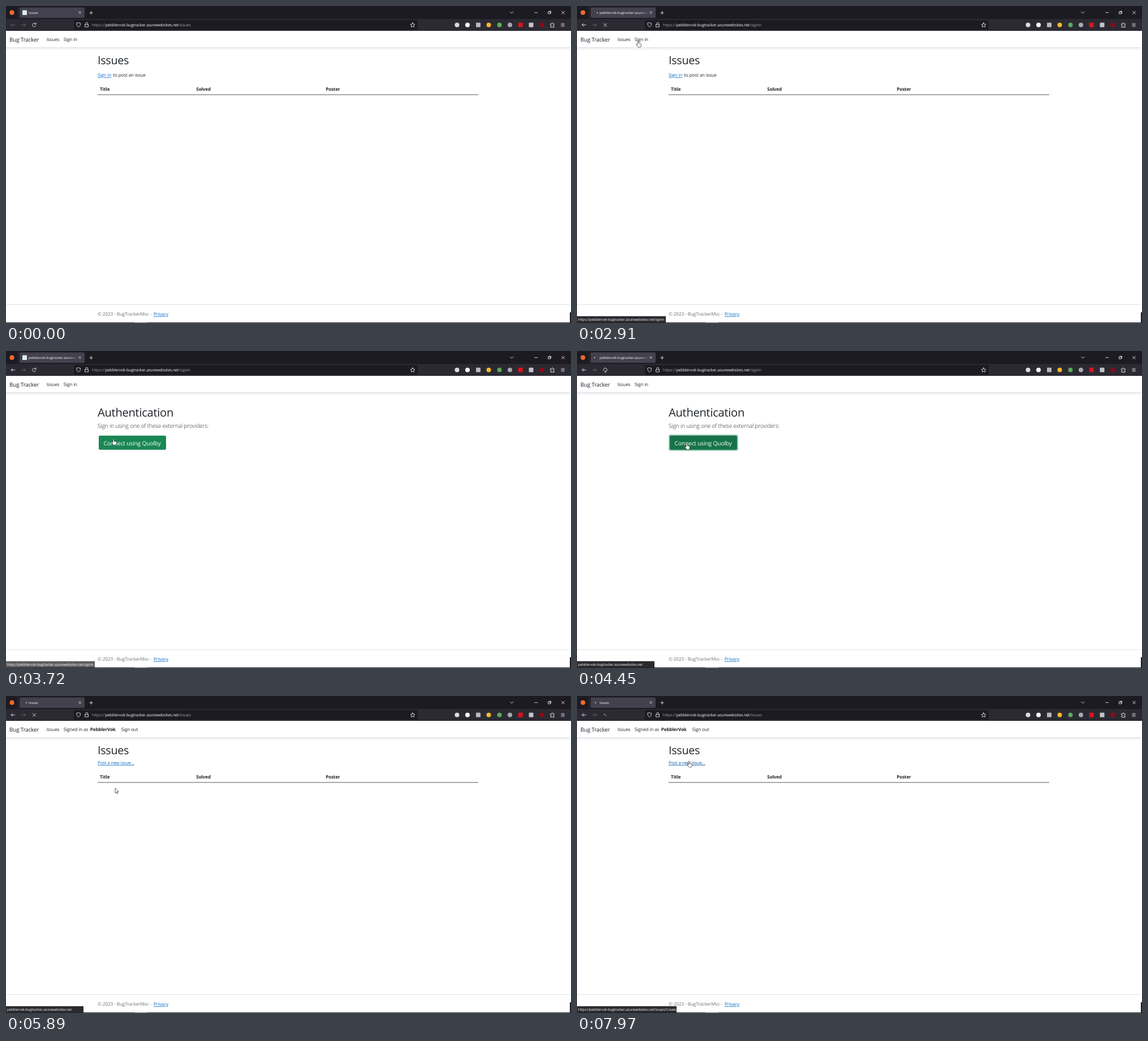
An HTML page that plays this animation: 999 by 561 pixels, repeating every 8 s.

```html
<!DOCTYPE html>
<html lang="en">
<head>
<meta charset="utf-8">
<title>Bug Tracker</title>
<style>
  html, body { margin: 0; width: 100%; height: 100%; overflow: hidden; background: #fff; }
  svg { display: block; width: 100%; height: 100%; }
  text {
    font: 8.1px "Open Sans", "Noto Sans", sans-serif;
    letter-spacing: -.015em;
    text-rendering: geometricPrecision;
    white-space: pre;
    fill: #212529;
  }
  .brand { font-size: 9.9px; }
  .h1 { font-size: 19.7px; }
  .auth { font-size: 20.2px; }
  .lead { font-size: 10.1px; font-weight: 300; }
  .btn { font-size: 10.2px; fill: #fff; }
  .b { font-weight: 700; }
  .link { fill: #0a6bc4; text-decoration: underline; }
  .foot { font-size: 8.25px; fill: #6c757d; }
  .tab { font-size: 5.9px; fill: #fbfbfe; }
  .url { font-size: 6.95px; fill: #fbfbfe; }
  .dim { fill: #a09fa6; }
  .status { font-size: 6.1px; fill: #fbfbfe; }
  .line { fill: none; stroke: #e4e4e8; stroke-width: .9; stroke-linecap: round; stroke-linejoin: round; }
  .cursor path { fill: #fff; stroke: #111; stroke-width: .65; stroke-linejoin: round; }
</style>
</head>
<body>
<svg viewBox="0 0 999 561">
  <defs>
    <linearGradient id="shade" x2="0" y2="1">
      <stop stop-color="#000" stop-opacity=".07"/>
      <stop offset="1" stop-color="#000" stop-opacity="0"/>
    </linearGradient>
    <linearGradient id="fade">
      <stop stop-color="#42414d" stop-opacity="0"/>
      <stop offset="1" stop-color="#42414d"/>
    </linearGradient>
    <clipPath id="tabClip"><path d="M39 5h87v15H39z"/></clipPath>
  </defs>

  <!-- tab strip -->
  <path d="M0 0h999v23H0z" fill="#1c1b22"/>
  <path d="M21 0h1v23h-1z" fill="#34333b"/>
  <circle cx="10.5" cy="11.7" r="4.1" fill="#f0682c"/>
  <rect x="24" y="2.5" width="115" height="18.5" rx="2" fill="#42414d"/>
  <rect id="favicon" x="29" y="7.4" width="8" height="8.6" rx=".6" fill="#dcebef"/>
  <circle id="dot" cy="11.8" r="1.15" fill="#d0d0d6"/>
  <g clip-path="url(#tabClip)"><text id="tabTitle" class="tab" x="40" y="14"></text></g>
  <path d="M111 4h15v16h-15z" fill="url(#fade)"/>
  <g class="line">
    <path d="M128.7 9.7l3.8 3.8m0-3.8l-3.8 3.8M147.8 12h5.6m-2.8-2.8v5.6"/>
    <path d="M891.5 10.2l2.7 2.7 2.7-2.7M934.8 11.6h4.8M982.6 9.3l4.8 4.8m0-4.8l-4.8 4.8"/>
    <path d="M958.8 10.4h3.5v3.5h-3.5zM960 10.2V9.2h3.5v3.6h-1"/>
  </g>

  <!-- tool bar -->
  <path d="M0 23h999v21H0z" fill="#2b2a33"/>
  <rect x="120" y="25" width="608" height="17" rx="2" fill="#1c1b22"/>
  <g class="line">
    <path id="back" d="M15.8 33.5H9m2.8-2.8L9 33.5l2.8 2.8"/>
    <path d="M27.5 33.5h6.8m-2.8-2.8l2.8 2.8-2.8 2.8" stroke="#696870"/>
    <path id="reload" d="M52.7 35a3.2 3.2 0 1 1-.3-3.4M53 29.8v2.4h-2.4"/>
    <path id="stop" d="M47.2 30.8l5.4 5.4m0-5.4l-5.4 5.4"/>
    <path id="spark" d="M47.7 31.4l3.4 3.7"/>
    <path d="M128.2 29.6l3.5 1.1q.1 4.8-3.5 6.8-3.6-2-3.5-6.8z"/>
    <path d="M140.8 32.6v-1.5a1.9 1.9 0 0 1 3.8 0v1.5M139.9 32.8h5.6v4.2h-5.6z"/>
    <path d="M719 29.6l1.2 2.5 2.8.4-2 1.9.5 2.8-2.5-1.3-2.5 1.3.5-2.8-2-1.9 2.8-.4z"/>
    <path d="M962.8 31.6h2v-.7a1.1 1.1 0 0 1 2.2 0v.7h2.2v2h-.7a1.1 1.1 0 0 0 0 2.2h.7v1.7h-6.4v-1.8h.5a1.1 1.1 0 0 0 0-2.2h-.5z"/>
    <path d="M981.8 31.1h5.4m-5.4 2.4h5.4m-5.4 2.4h5.4"/>
  </g>
  <g id="addons"></g>
  <text class="url dim" x="152" y="36.2">https://</text>
  <text class="url" x="175.4" y="36.2">pebblervok-bugtracker.azurewebsites.net<tspan id="path" class="dim"></tspan></text>

  <!-- site header and footer -->
  <path d="M0 44h999v516H0z" fill="#fff"/>
  <path d="M0 74h997v5H0z" fill="url(#shade)"/>
  <path d="M0 73h997v1H0zM0 528h997v1H0z" fill="#dee2e6"/>
  <text class="brand" x="6" y="63.4">Bug Tracker</text>
  <text x="71.7" y="62.4">Issues</text>
  <text class="foot" x="162" y="548.3">© 2023 - BugTrackerMvc -</text>
  <text class="link" x="261" y="548.3">Privacy</text>

  <g id="guest"><text x="101.8" y="62.4">Sign in</text></g>
  <g id="member">
    <text x="101.8" y="62.4">Signed in as</text>
    <text class="b" x="148.8" y="62.4">PebblerVok</text>
    <text x="203.7" y="62.4">Sign out</text>
    <text id="post" class="link" x="162" y="121.2" style="font-size:7.9px">Post a new issue...</text>
  </g>

  <g id="list">
    <text class="h1" x="162" y="103.2">Issues</text>
    <g id="invite">
      <text class="link" x="162" y="125.4">Sign in</text>
      <text x="189.2" y="125.4">to post an issue</text>
    </g>
    <g id="table">
      <text class="b" x="166" y="150.2">Title</text>
      <text class="b" x="336.3" y="150.2">Solved</text>
      <text class="b" x="565.3" y="150.2">Poster</text>
      <path d="M162 156.5h673v1H162z" fill="#53575a"/>
    </g>
  </g>

  <g id="auth">
    <text class="auth" x="162" y="115.6">Authentication</text>
    <text class="lead" x="162" y="136.2">Sign in using one of these external providers:</text>
    <rect id="ring" x="162" y="147.8" width="123" height="29" rx="3.5" fill="#9dccb6"/>
    <rect id="button" x="164" y="149.8" width="119" height="25" rx="2"/>
    <text class="btn" x="172.6" y="166.6">Connect using Quolby</text>
  </g>

  <!-- desktop edge -->
  <path d="M0 560h999v1H0zM997 542h2v19h-2z" fill="#1b1b1f"/>
  <path d="M227 560h23v1h-23z" fill="#66666c"/>

  <g id="status">
    <rect id="statusBox" y="549" height="11.3" fill="#2b2a2f"/>
    <text id="statusText" class="status" x="2" y="556.9"></text>
  </g>

  <g id="cursor" class="cursor">
    <path id="arrow" d="M0 0V8.8L2 7l1.4 3.1 1.4-.6L3.4 6.4H6.2Z"/>
    <path id="hand" d="M-1 1a1 1 0 0 1 2 0V4.2q1-.6 1.6.2 1-.5 1.5.3 1.2-.3 1.2 1V8q0 3-2.6 3H1.4Q0 11-.8 9.8L-3 7q-.6-1 .3-1.3.8-.1 1.7 1Z"/>
  </g>
</svg>
<script>
const LOOP = 8000, STEP = 90;
const HOST = 'pebblervok-bugtracker.azurewebsites.net';
const el = {};
document.querySelectorAll('svg [id]').forEach(n => el[n.id] = n);

// x, colour, square?
const addons = [
  [797.5, '#dcdce0'], [816, '#fafafa'], [835, '#b9b9bd', 1], [853.5, '#f6b92d'], [872.5, '#5cab58'],
  [891, '#a9a9ae'], [909.7, '#d9141e', 1], [928.5, '#c4c4c8', 1], [947.2, '#8d0b17']
];
el.addons.innerHTML = addons.map(([x, c, square]) => square
  ? `<rect x="${x - 4}" y="29.4" width="8" height="8" rx="1" fill="${c}"/>`
  : `<circle cx="${x}" cy="33.4" r="4" fill="${c}"/>`).join('');

// time, x, y
const moves = [
  [930, 876, 152], [1290, 480, 135], [1650, 239, 101], [1740, 197, 84], [1830, 162.7, 72],
  [1920, 141, 66], [2280, 108, 62], [3180, 108, 62], [3270, 112, 62], [3360, 112, 62],
  [3450, 120, 70], [3720, 190, 155.5], [3900, 194, 163.5], [5620, 194, 163.5], [5710, 193, 163],
  [7070, 193, 163], [7160, 194, 158], [7340, 198, 128], [7610, 198, 115.3], [LOOP, 198, 115.3]
];
const hands = [[2100, 3540], [3720, 5710], [7430, LOOP]];

// start, end, throbber origin
const loads = [[2460, 3180, 2440], [4360, 6250, 4340], [7880, 9000, 7740]];

// start, end, text, width
const notes = [
  [2190, 3900, `https://${HOST}/signin`, 157],
  [4360, 6250, HOST, 137],
  [7430, LOOP, `https://${HOST}/Issues/Create`, 176]
];

// time, address path, tab title
const places = [[0, '/issues', 'Issues'], [2820, '/signin', HOST], [5710, '/issues', 'Issues']];

const within = (rows, t) => rows.find(r => t >= r[0] && t < r[1]);
const show = (node, on) => node.style.display = on ? '' : 'none';

// screen updates arrive in bursts on a fixed step
function snap(t) {
  const base = [7160, 4360, 930].find(b => t >= b);
  return base === undefined ? 0 : base + Math.floor((t - base) / STEP) * STEP;
}

function moveCursor(t) {
  show(el.cursor, t >= 930);
  if (t < 930) return;
  const i = moves.findIndex(m => m[0] > t);
  const [t0, x0, y0] = moves[i - 1], [t1, x1, y1] = moves[i];
  const k = (t - t0) / (t1 - t0);
  el.cursor.setAttribute('transform', `translate(${x0 + (x1 - x0) * k} ${y0 + (y1 - y0) * k})`);
  const hand = !!within(hands, t);
  show(el.hand, hand);
  show(el.arrow, !hand);
}

function drawLoading(t) {
  const load = within(loads, t);
  const age = load ? t - load[2] : 0;
  show(el.favicon, !load);
  show(el.dot, load);
  el.dot.setAttribute('cx', 33.2 - 3 * Math.cos(2 * Math.PI * age / 1050));
  show(el.reload, age < 150);
  show(el.spark, age >= 150 && age < 250);
  show(el.stop, age >= 250);
  el.reload.setAttribute('transform', `rotate(${load && age > 60 ? 130 : 0} 49.9 33.5)`);
  el.reload.style.opacity = loads.some(l => t >= l[1] && t < l[1] + 360) ? .4 : 1;
}

function drawStatus(t) {
  const note = within(notes, t);
  show(el.status, note);
  if (!note) return;
  el.statusBox.setAttribute('width', note[3]);
  el.statusText.textContent = note[2];
  el.status.style.opacity = t >= 3690 && t < 3900 ? (t < 3780 ? .75 : .35) : 1;
}

function drawPage(t) {
  const auth = t >= 3000 && t < 5710, member = t >= 5710;
  show(el.auth, auth);
  show(el.list, !auth);
  show(el.guest, !member);
  show(el.member, member);
  show(el.invite, !member);
  el.table.setAttribute('transform', `translate(0 ${member ? -4 : 0})`);
  show(el.ring, t >= 4360);
  el.button.setAttribute('fill', t < 3780 ? '#198754' : '#157347');
  el.post.style.fill = t >= 7430 ? '#07559f' : '';
  const [, path, title] = places.filter(p => t >= p[0]).pop();
  el.path.textContent = path;
  el.tabTitle.textContent = title;
  el.back.style.stroke = t >= 2820 ? '' : '#696870';
}

const start = performance.now();
function tick(now) {
  const t = snap(Math.max(0, now - start) % LOOP);
  drawPage(t);
  drawLoading(t);
  drawStatus(t);
  moveCursor(t);
  requestAnimationFrame(tick);
}
tick(start);
</script>
</body>
</html>
```
